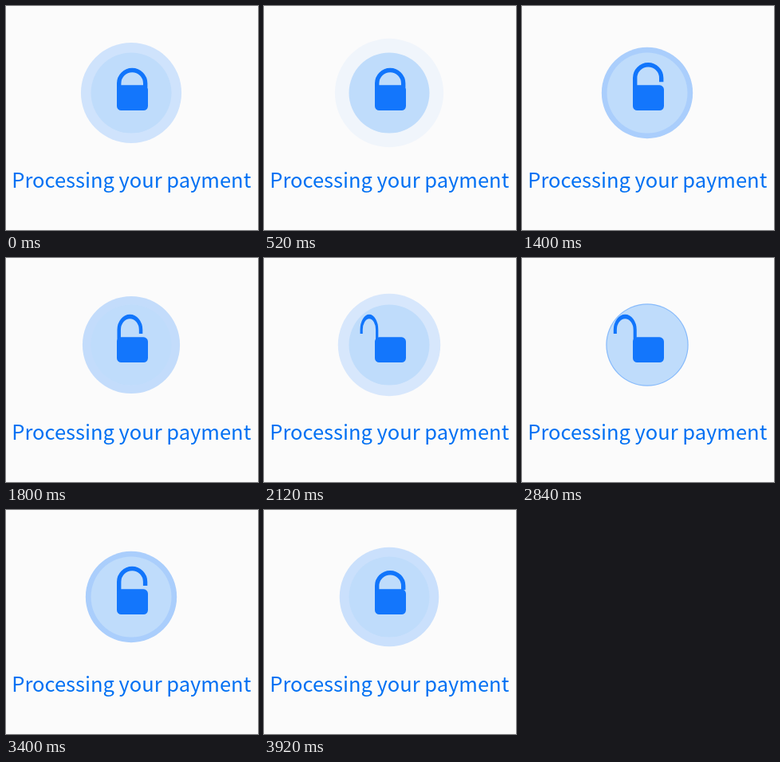
These frames come from a looping animation (316x281 px, 3960 ms). An HTML page:

```html
<!DOCTYPE html>
<html lang="en">
<head>
<meta charset="utf-8">
<title>Processing your payment</title>
<style>
  html, body { margin: 0; width: 100%; height: 100%; overflow: hidden; background: #fbfbfb; }
  svg { display: block; width: 316px; height: 281px; }
  text { font: 25.5px "Noto Sans CJK JP", "Noto Sans CJK SC", "Noto Sans CJK", sans-serif; fill: #0070f3; }
</style>
</head>
<body>
<svg viewBox="0 0 316 281">
  <circle id="ring" cx="157" cy="109" fill="#0070fb"/>
  <circle cx="157" cy="109" r="50.5" fill="#bfdcfb"/>
  <path id="shackle" d="M0 112V97a16.5 16.5 0 0 1 33 0v5" fill="none" stroke="#1175fb" stroke-width="5.4"/>
  <rect x="139" y="99.3" width="39" height="31.7" rx="5.5" fill="#1376fc"/>
  <text x="157.3" y="227.5" text-anchor="middle">Processing your payment</text>
</svg>
<script>
  const LOOP = 3960, PULSE = 2000, PULSE_START = 700, TURN = 2505;
  const ring = document.getElementById('ring');
  const shackle = document.getElementById('shackle');

  const progress = (t, from, to) => Math.min(1, Math.max(0, (t - from) / (to - from)));
  const easeInOut = p => p ** 1.75 / (p ** 1.75 + (1 - p) ** 1.75);

  function draw(now) {
    const t = now % LOOP;

    const pulse = (t - PULSE_START + PULSE) % PULSE / PULSE;
    ring.setAttribute('r', 50.3 + 19.6 * pulse);
    ring.setAttribute('opacity', 0.5 * (1 - pulse));

    // The lock opens until TURN, then plays backwards.
    const pose = TURN - Math.abs(t - TURN);
    const lift = 7 * easeInOut(progress(pose, 1000, 1500) ** 0.6);
    const swing = Math.cos(Math.PI * easeInOut(progress(pose, 1495, TURN)));
    shackle.setAttribute('transform', `translate(141.7 ${-lift}) scale(${swing} 1)`);
  }

  const start = performance.now();
  function tick() {
    draw(performance.now() - start);
    requestAnimationFrame(tick);
  }
  tick();
</script>
</body>
</html>
```
